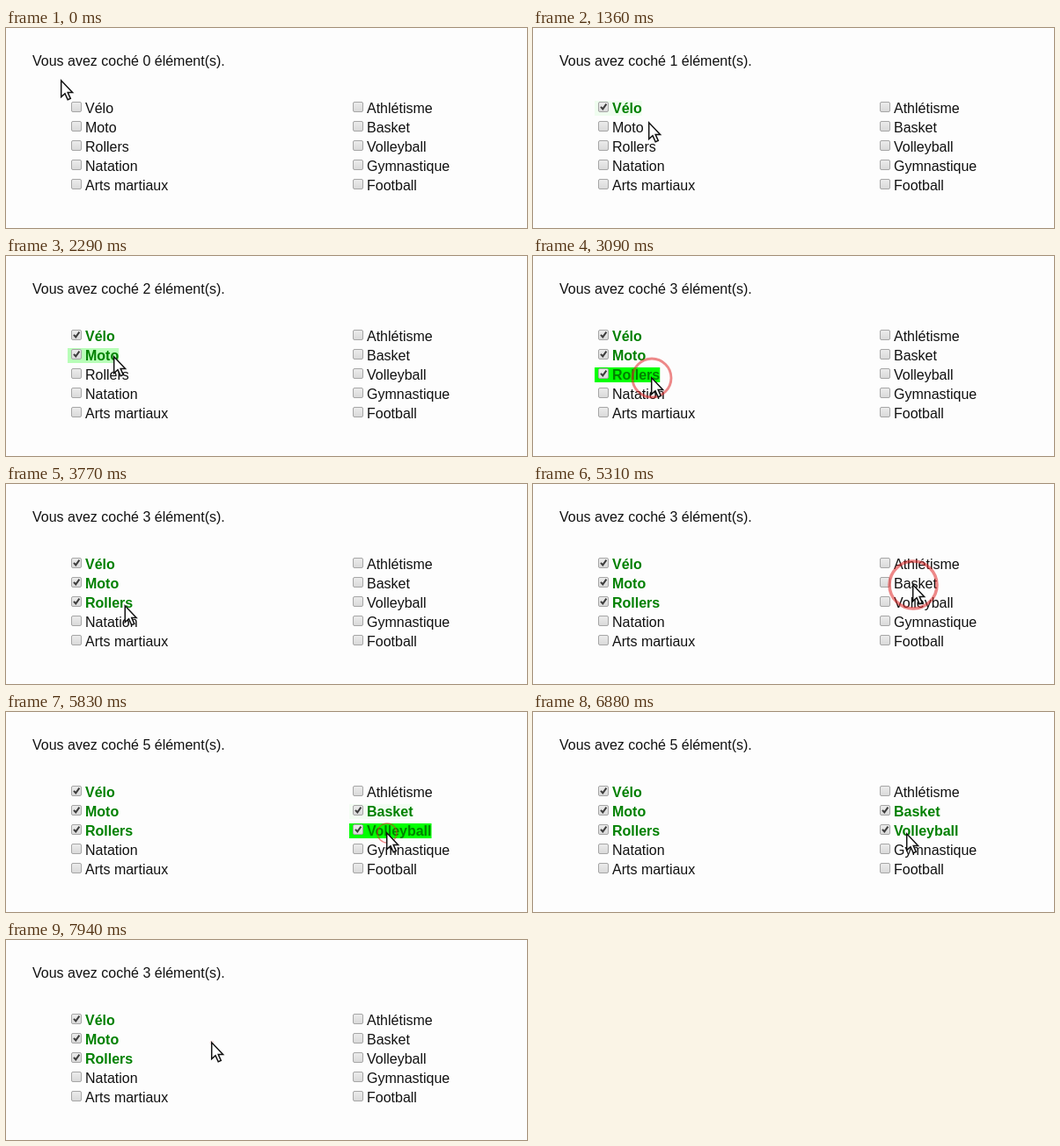
An HTML page for the animation above (8000 ms loop, 592 by 228 pixels).

```html
<!DOCTYPE html>
<html lang="fr">
<head>
<meta charset="utf-8">
<title>Cases à cocher</title>
<style>
  html, body { margin: 0; width: 100%; height: 100%; overflow: hidden; background: #fdfdfd; }
  svg { display: block; width: 592px; height: 228px; font: 16px "Liberation Sans", Arial, sans-serif; fill: #111; }
  .box { fill: url(#face); stroke: #a6a6a6; }
  .tick { fill: none; stroke: #3c3c3c; stroke-width: 2; visibility: hidden; }
  .glow { fill: #0f0; opacity: 0; }
  .on text { font-weight: bold; fill: #008000; }
  .on .tick { visibility: visible; }
  #ring { fill: none; stroke: #e02828; stroke-opacity: .55; }
</style>
</head>
<body>
<svg viewBox="0 0 592 228">
  <defs>
    <linearGradient id="face" x2="0" y2="1">
      <stop stop-color="#ececec"/><stop offset="1" stop-color="#d9d9d9"/>
    </linearGradient>
  </defs>
  <text id="count" x="30" y="43"></text>
  <g id="list"></g>
  <circle id="ring"/>
  <path id="cursor" fill="#fff" stroke="#111" stroke-width="1.5"
        d="M.7 .8V19.6L5 15.7 8.2 22.8 11.3 21.4 8.2 14.5H13.6Z"/>
</svg>
<script>
const LOOP = 8000, GLOW = 650, RING = 400, RADIUS = 40;
const $ = id => document.getElementById(id);
const labels = ['Vélo', 'Moto', 'Rollers', 'Natation', 'Arts martiaux',
                'Athlétisme', 'Basket', 'Volleyball', 'Gymnastique', 'Football'];

// Each click: label index, press time, toggle time
const clicks = [
  [0, 830, 900], [1, 1820, 2010], [2, 2910, 3085],
  [6, 5180, 5340], [7, 5540, 5825], [7, 7000, 7140], [6, 7560, 7800]
];

// Pointer stops: time, x, y
const path = [
  [0, 62, 59], [590, 111, 96], [900, 111, 96], [1360, 131, 107], [1560, 158, 127],
  [1820, 122, 114], [2350, 122, 114], [2850, 134, 138], [3750, 134, 138],
  [4550, 437, 125], [5050, 431, 114], [5350, 431, 114], [5600, 432, 137],
  [5900, 432, 137], [6480, 468, 158], [6630, 404, 128], [6880, 424, 138],
  [7200, 424, 138], [7480, 430, 114], [7810, 430, 114], [7940, 233, 116]
];

// Screen refreshes: first time, last time, number of steps
const ticks = [
  [0, 0, 1], [100, 590, 5], [840, 1490, 6], [1640, 2020, 4], [2160, 2940, 7],
  [3090, 3090, 1], [3250, 4030, 7], [4160, 4920, 7], [5050, 5830, 7],
  [5960, 6480, 5], [6630, 6630, 1], [6880, 7530, 6], [7670, 7670, 1], [7810, 7940, 2]
].flatMap(([a, b, n]) => Array.from({ length: n }, (_, i) => n > 1 ? a + (b - a) * i / (n - 1) : a));

$('list').innerHTML = labels.map((name, i) => {
  const x = i < 5 ? 70 : 390, y = 97 + i % 5 * 22;
  return `<g transform="translate(${x} ${y})">
    <rect class="glow" y="-14" height="17"/>
    <rect class="box" x="4.5" y="-12.5" width="11" height="11" rx="1.5"/>
    <path class="tick" d="M7 -7.2L9.3 -4.6 13.4 -10.4"/>
    <text x="20">${name}</text></g>`;
}).join('');
const items = [...$('list').children].map(g => ({
  g, glow: g.querySelector('.glow'), text: g.querySelector('text')
}));

// CSS "ease" curve, solved by bisection
function ease(p) {
  const bez = (a, b, s) => 3 * a * s * (1 - s) ** 2 + 3 * b * s * s * (1 - s) + s ** 3;
  let lo = 0, hi = 1;
  for (let i = 0; i < 16; i++) {
    const mid = (lo + hi) / 2;
    if (bez(.25, .25, mid) < p) lo = mid; else hi = mid;
  }
  return bez(.1, 1, lo);
}

function pointer(t) {
  const i = path.findIndex(k => k[0] > t);
  if (i < 0) return path[path.length - 1].slice(1);
  const [a, x, y] = path[i - 1], [b, u, v] = path[i];
  const p = (t - a) / (b - a), s = p * p * (3 - 2 * p);
  return [x + (u - x) * s, y + (v - y) * s];
}

function render(t) {
  const [x, y] = pointer(t);
  $('cursor').setAttribute('transform', `translate(${x} ${y})`);

  let total = 0;
  items.forEach(({ g, glow, text }, i) => {
    const past = clicks.filter(c => c[0] === i && c[2] <= t);
    const on = past.length % 2 === 1;
    g.setAttribute('class', on ? 'on' : '');
    total += on;
    const age = on ? (t - past[past.length - 1][2]) / GLOW : 1;
    glow.style.opacity = age < 1 ? 1 - ease(age) : 0;
    if (age < 1) glow.setAttribute('width', 20 + text.getComputedTextLength());
  });
  $('count').textContent = `Vous avez coché ${total} élément(s).`;

  const press = clicks.find(c => t >= c[1] && t < c[1] + RING);
  const r = press ? RADIUS * (1 - (t - press[1]) / RING) : 0;
  const ring = $('ring');
  ring.setAttribute('cx', x + 1);
  ring.setAttribute('cy', y + 1);
  ring.setAttribute('r', r);
  ring.setAttribute('stroke-width', r * .13);
}

const start = performance.now();
function loop() {
  const t = (performance.now() - start) % LOOP;
  render(ticks.filter(k => k <= t).pop());
  requestAnimationFrame(loop);
}
loop();
</script>
</body>
</html>
```
